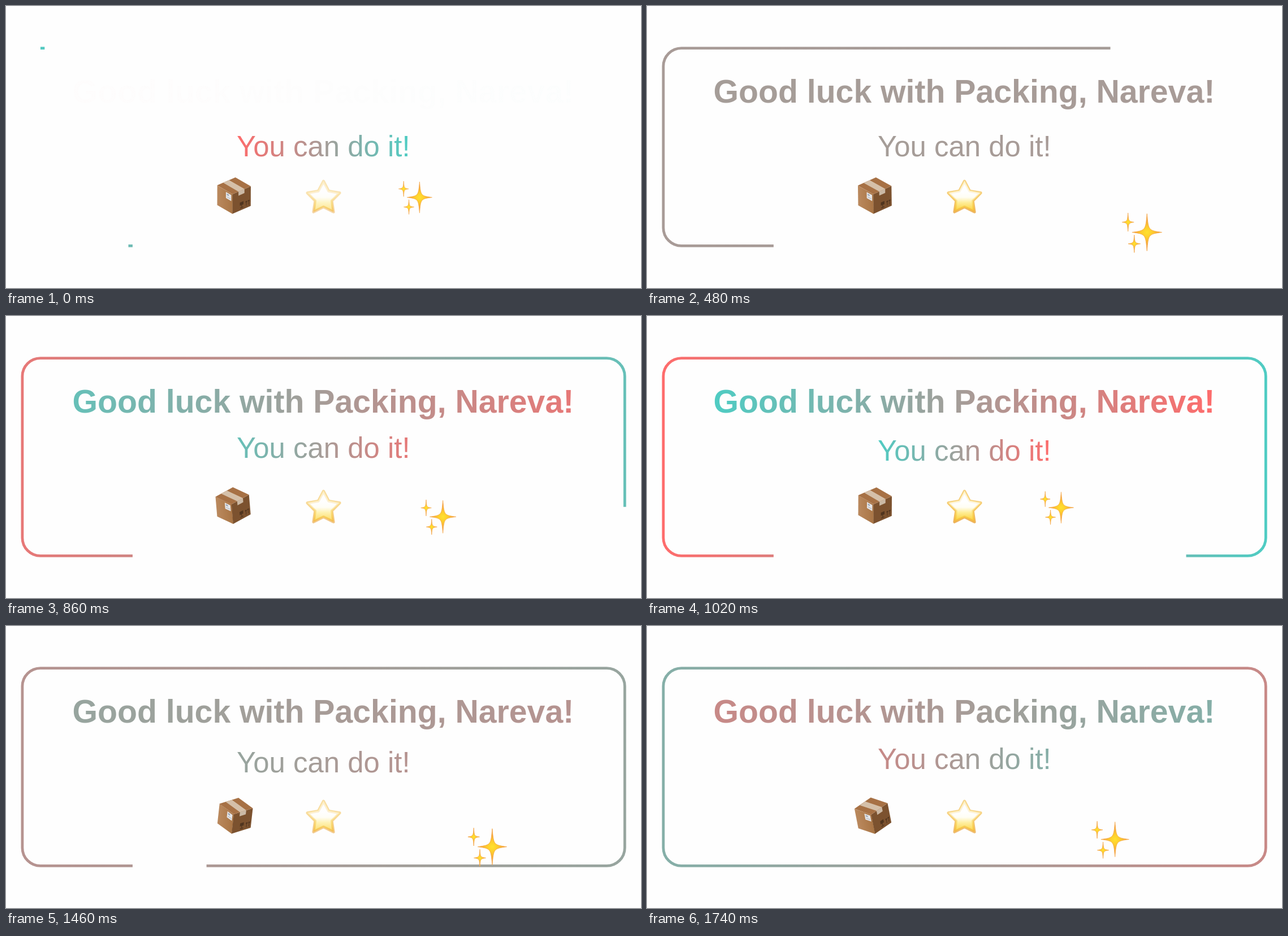
An HTML page with a canvas for the animation above (1.76 s loop, 1123 px wide and 499 px high).

```html
<!DOCTYPE html>
<html lang="en">
<head>
<meta charset="utf-8">
<title>Good luck</title>
<style>
  html, body { margin: 0; width: 100%; height: 100%; overflow: hidden; background: #fefefe; }
  canvas { display: block; }
</style>
</head>
<body>
<canvas id="stage" width="1123" height="499"></canvas>
<script>
const ctx = document.getElementById('stage').getContext('2d');
const LOOP = 1760, STEP = 20;
const RED = [255, 107, 107], TEAL = [78, 205, 196];
const FRAME = { l: 28.9, t: 74.6, r: 1094.3, b: 424.4, radius: 32, dash: 2226 };

// Loop time in ms -> scene time in seconds; the pace eases off towards the end.
function sceneTime(ms) {
  const t = ms / 1000;
  return .01 + t * (1.927 + .175 * (t - 1.5) ** 2);
}

// Linear 0 -> 1 -> 0 over one period.
function triangle(s, period) {
  const p = (s % period) / period;
  return p < .5 ? 2 * p : 2 - 2 * p;
}

// 0 -> 1 at a third, -1 at two thirds, back to 0.
function swing(s, period) {
  const p = 3 * (s % period) / period;
  return p < 1 ? p : p < 2 ? 3 - 2 * p : p - 3;
}

function mix(a, b, f) {
  return `rgb(${a.map((v, i) => Math.round(v + (b[i] - v) * f)).join()})`;
}

// Evenly spaced colours along a line.
function gradient(x0, y0, x1, y1, ...colors) {
  const g = ctx.createLinearGradient(x0, y0, x1, y1);
  colors.forEach((c, i) => g.addColorStop(i / (colors.length - 1), c));
  return g;
}

function drawFrame(s, left, right) {
  const { l, t, r, b, radius, dash } = FRAME;
  const on = Math.min(1, s / 3) * dash;
  ctx.beginPath();
  ctx.moveTo(l + radius, t);
  ctx.arcTo(r, t, r, b, radius);
  ctx.arcTo(r, b, l, b, radius);
  ctx.arcTo(l, b, l, t, radius);
  ctx.arcTo(l, t, r, t, radius);
  ctx.closePath();
  ctx.setLineDash(on < dash ? [on, dash - on] : []);
  ctx.lineWidth = 4.8;
  ctx.strokeStyle = gradient(l, 0, r, 0, left, right);
  ctx.stroke();
  ctx.setLineDash([]);
}

function drawText(text, font, x, y, left, right) {
  ctx.font = `${font} "Liberation Sans", Arial, sans-serif`;
  ctx.fillStyle = gradient(x, 0, x + ctx.measureText(text).width, 0, left, right);
  ctx.fillText(text, x, y);
}

// Maps the unit square onto a box face spanned by u and v, and paints it.
function face(origin, u, v, color, details) {
  const rect = (c, x, y, w, h) => {
    ctx.fillStyle = c;
    ctx.fillRect(x, y, w, h);
  };
  ctx.save();
  ctx.transform(...u, ...v, ...origin);
  rect(color, 0, 0, 1.01, 1.01);
  details(rect);
  ctx.restore();
}

function drawBox(s) {
  const toRight = [32, -14], toLeft = [-27, -15.5], toFront = [27, 15.5], down = [0, 34.5];
  const tape = 'rgba(226, 214, 198, .78)', ink = '#50351f';
  ctx.save();
  ctx.translate(402, 354);
  ctx.rotate(swing(s, 2) * Math.PI / 15);
  ctx.translate(-1.5, -21);   // nearest top corner

  face(toLeft, toFront, down, gradient(0, 0, 1, 0, '#ba895e', '#a97545'), rect => {
    rect('#e6e6e8', .57, .08, .35, .31);
    rect('#9ba6b5', .63, .13, .13, .08);
    rect('#b4bbc4', .63, .28, .24, .04);
  });
  face([0, 0], toRight, down, '#7c522f', rect => {
    rect(tape, .33, 0, .33, .21);
    rect(ink, .41, .6, .2, .16);
    rect(ink, .49, .76, .04, .1);
    rect(ink, .43, .87, .17, .04);
    for (const x of [.72, .85]) {
      rect(ink, x, .66, .09, .06);
      rect(ink, x + .03, .66, .03, .24);
    }
  });
  face([0, 0], toRight, toLeft, '#a77145', rect => rect(tape, .33, 0, .33, 1));
  ctx.restore();
}

function starPath(cx, cy, outer, inner) {
  ctx.beginPath();
  for (let i = 0; i < 10; i++) {
    const a = i * Math.PI / 5, r = i % 2 ? inner : outer;
    ctx.lineTo(cx + r * Math.sin(a), cy - r * Math.cos(a));
  }
  ctx.closePath();
}

function drawStar(s) {
  ctx.save();
  ctx.globalAlpha = .45 + .55 * triangle(s, 1.5);
  ctx.lineJoin = 'round';
  starPath(561.5, 340, 30, 15.5);
  ctx.lineWidth = 5;
  ctx.strokeStyle = gradient(0, 307, 0, 368, '#f2c566', '#f4be4c', '#e9a139');
  ctx.stroke();
  starPath(561.5, 339.6, 29.5, 15.5);
  ctx.fillStyle = gradient(0, 310, 0, 367, '#fffbe8', '#ffffff', '#ffffff', '#fffdf0', '#ffe97c', '#fcd235', '#f2b439');
  ctx.fill();
  ctx.lineWidth = 1.5;
  ctx.strokeStyle = gradient(0, 310, 0, 367, '#fff0b8', '#ffeeb0', '#f8cf52', '#efb03a');
  ctx.stroke();
  ctx.restore();
}

// Four-pointed star with thin, curved arms.
function sparkle(x, y, w, h) {
  ctx.save();
  ctx.translate(x, y);
  const g = ctx.createRadialGradient(0, 0, 0, 0, 0, h);
  ['#ffe22e', '#fdc92f', '#f6a53a', '#f2953c'].forEach((c, i) => g.addColorStop(i / 3, c));
  ctx.beginPath();
  ctx.moveTo(0, -h);
  for (const [sx, sy] of [[1, -1], [1, 1], [-1, 1], [-1, -1]]) {
    const cx = sx * w * .1, cy = sy * h * .1;
    const flat = sx * sy < 0;
    ctx.bezierCurveTo(cx, cy, cx, cy, flat ? sx * w : 0, flat ? 0 : sy * h);
  }
  ctx.closePath();
  ctx.fillStyle = g;
  ctx.fill();
  ctx.lineJoin = 'round';
  ctx.lineWidth = .7;
  ctx.strokeStyle = '#f4a647';
  ctx.stroke();
  ctx.restore();
}

function drawSparkles(s) {
  const f = triangle(s, 2), size = 1 + .2 * f;
  ctx.save();
  ctx.translate(722.5 + 156.5 * f, 338.5 + 64 * f);
  ctx.scale(size, size);
  sparkle(7.3, -.5, 22, 27.5);
  sparkle(-20.8, -15.5, 8.8, 13.6);
  sparkle(-11.5, 16.5, 9, 13);
  ctx.restore();
}

function draw() {
  const ms = Math.floor(performance.now() % LOOP / STEP) * STEP;
  const s = sceneTime(ms);
  const f = triangle(s, 4);
  const left = mix(RED, TEAL, f), right = mix(TEAL, RED, f);
  const lift = 15.6 * triangle(Math.max(0, s - 1), 1.5);

  ctx.fillStyle = '#fefefe';
  ctx.fillRect(0, 0, 1123, 499);
  drawFrame(s, right, left);
  ctx.globalAlpha = Math.min(1, s);
  drawText('Good luck with Packing, Nareva!', 'bold 57.2px', 117.6, 171, left, right);
  ctx.globalAlpha = 1;
  drawText('You can do it!', '50.9px', 408, 266 - lift, left, right);
  drawBox(s);
  drawStar(s);
  drawSparkles(s);
  requestAnimationFrame(draw);
}
draw();
</script>
</body>
</html>
```
